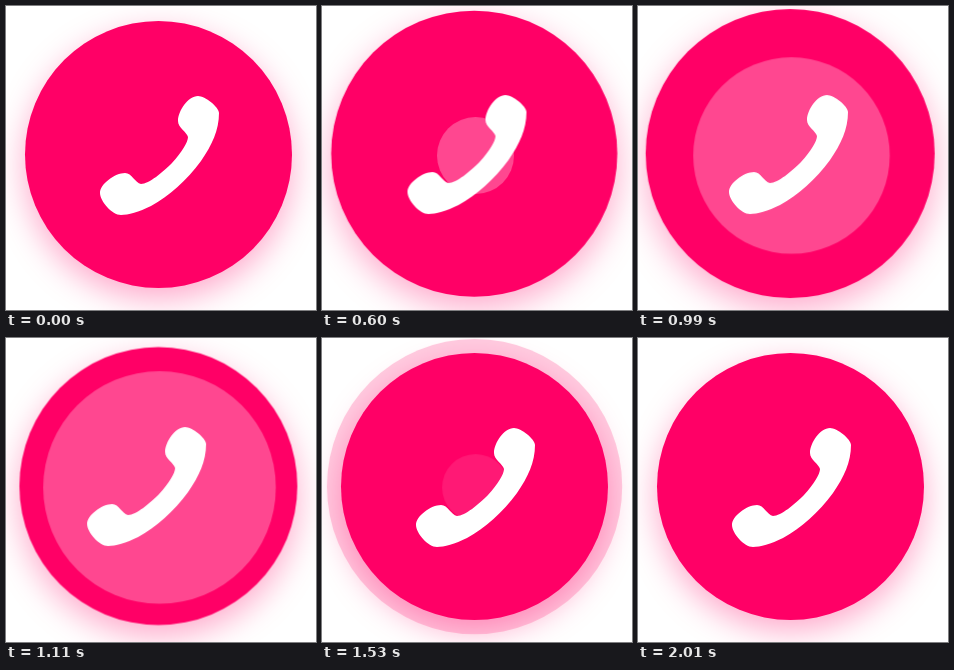
Animation of 310 by 304 pixels, one loop 2400 ms. Source, as an HTML page:

```html
<!DOCTYPE html>
<html lang="en">
<head>
<meta charset="utf-8">
<title>Ringing call button</title>
<style>
  html, body { margin: 0; width: 100%; height: 100%; overflow: hidden; background: #fff; }
  .stage { position: relative; width: 310px; height: 304px; overflow: hidden; }
  .disc {
    position: absolute;
    left: calc(var(--x) - var(--r));
    top: calc(var(--y) - var(--r));
    width: calc(2 * var(--r));
    height: calc(2 * var(--r));
    border-radius: 50%;
  }
  .disc, .phone { animation: 2400ms linear infinite; }
  .halo, .button { --x: 152.5px; --y: 148.5px; --r: 133.5px; background: #ff0066; }
  .halo { animation-name: halo; }
  .button { box-shadow: 0 11px 32px rgba(255, 0, 102, .34); animation-name: swell; }
  .ripple { --x: 153.5px; --y: 149.5px; --r: 116.5px; background: #fff; animation-name: ripple; }
  .phone { position: absolute; left: 0; top: 0; fill: #fff; animation-name: shake; }

  @keyframes swell {
    0%, 12.5%    { transform: none; }
    35.42%       { transform: translate(-.5px, -1.5px) scale(1.131); }
    51.25%, 100% { transform: none; }
  }
  @keyframes ripple {
    0%, 14.58%   { transform: scale(0); opacity: .28; }
    46.25%       { transform: scale(1); }
    55%          { opacity: .28; }
    68.75%       { opacity: 0; }
    70.83%, 100% { transform: scale(0); opacity: 0; }
  }
  @keyframes shake {
    0%, 12.5%    { transform: none; }
    23.33%       { transform: translate(-13px, -1px); }
    33.33%       { transform: translate(13px, -1px); }
    46.25%       { transform: translate(-13px, -1px); }
    52.1%, 100%  { transform: none; }
  }
  @keyframes halo {
    0%           { transform: none; opacity: 0; }
    53.74%       { transform: none; opacity: 0; }
    53.75%       { transform: none; opacity: .4; animation-timing-function: ease-in-out; }
    73.75%, 100% { transform: scale(1.21); opacity: 0; }
  }
</style>
</head>
<body>
<div class="stage">
  <div class="disc halo"></div>
  <div class="disc button"></div>
  <div class="disc ripple"></div>
  <svg class="phone" width="310" height="304" viewBox="0 0 310 304">
    <path d="M192 90C199 90 213 101 213 107C213 124 206 139 195 155
      C181 174 163 190 145 200C133 206 122 209 115 209C106 209 94 195 94 187
      C94 178 109 167 119 167C126 167 129 177 135 178C143 178 157 166 166 157
      C176 146 182 136 182 131C181 126 172 122 172 115C172 105 182 90 192 90Z"/>
  </svg>
</div>
</body>
</html>
```
